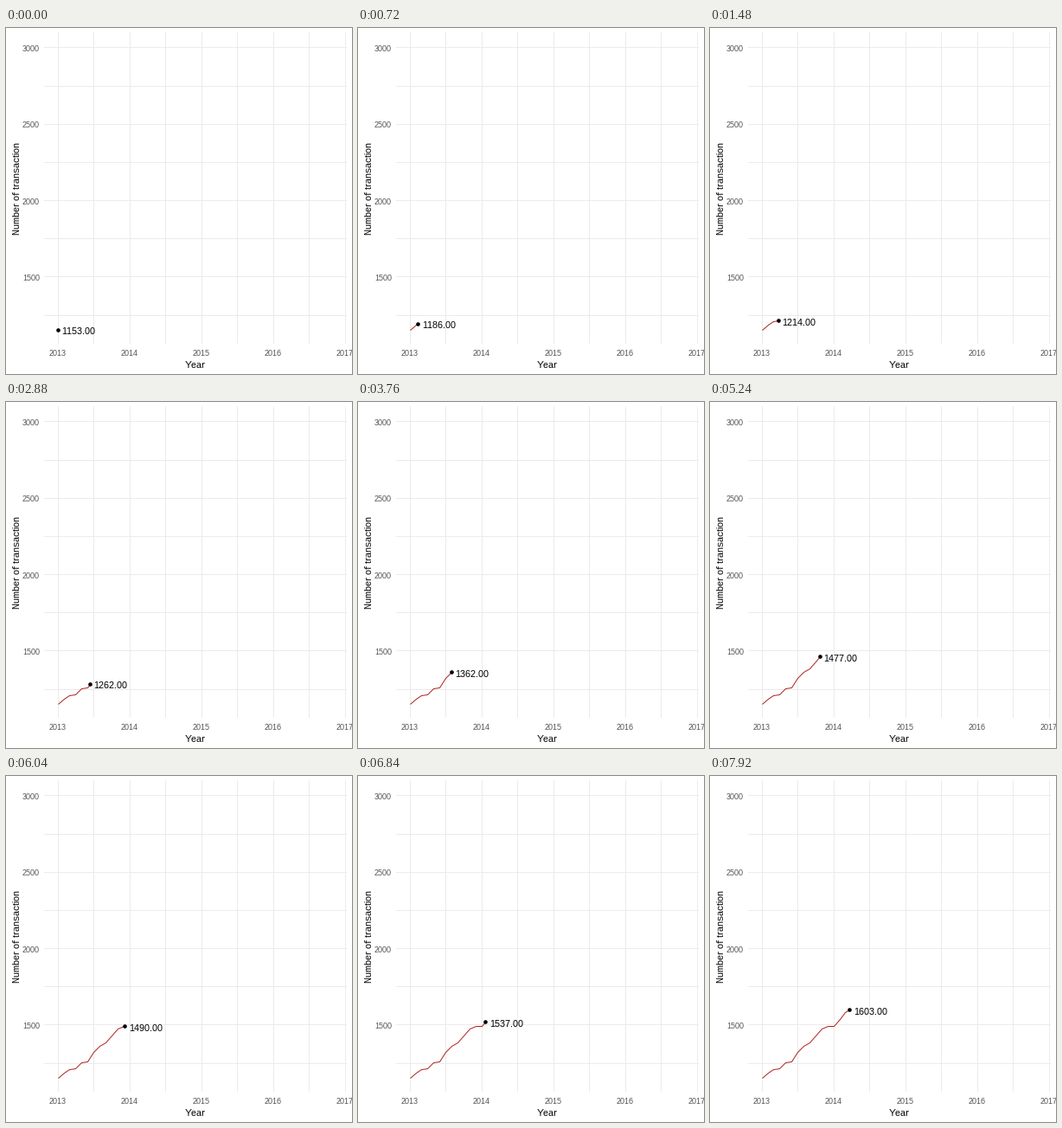
Write a matplotlib script that moves like this. It is 400 px wide and 400 px high and loops after 8 s.

```python
import math
import numpy as np
import matplotlib.pyplot as plt
from matplotlib.animation import FuncAnimation
from matplotlib.patches import Circle

SIZE, FRAMES, STEP_MS = 400, 200, 40
X0, YEAR_PX = 60.0, 83.0
SPEED = 0.511  # pixels per frame

# Whole-pixel hinting keeps the small text crisp
plt.rcParams.update({"font.family": "Liberation Sans",
                     "text.hinting": "native",
                     "text.hinting_factor": 1})

# Monthly counts, starting January 2013
COUNTS = np.array([1153, 1186, 1207, 1214, 1251, 1262, 1321, 1362,
                   1386, 1427, 1477, 1490, 1490, 1537, 1584, 1603])
MONTHS = np.datetime64("2013-01") + np.arange(len(COUNTS))
DAYS = (MONTHS.astype("datetime64[D]") - np.datetime64("2013-01-01")).astype(int)
XS = X0 + DAYS * YEAR_PX / 365


def to_y(value):
    return 287.5 - (value - 1500) * 265 / 1500


def pixel(v):
    """Centre of the nearest pixel."""
    return np.ceil(np.asarray(v) - 0.5) + 0.5


YS = to_y(COUNTS)

fig = plt.figure(figsize=(SIZE / 72, SIZE / 72), dpi=72, facecolor="white")
ax = fig.add_axes([0, 0, 1, 1])
ax.set_xlim(0, SIZE)
ax.set_ylim(SIZE, 0)
ax.axis("off")


def rule(xs, ys):
    ax.plot(xs, ys, color="#EBEBEB", lw=1, snap=False,
            solid_capstyle="butt", zorder=1)


def tick(x, y, text, ha):
    ax.text(x, y, text, size=9, color="#4D4D4D", ha=ha, va="baseline")


for k in range(9):
    x = pixel(X0 + k * YEAR_PX / 2)
    rule([x, x], [5, 365])
for value in range(1250, 3001, 250):
    y = pixel(to_y(value))
    rule([44, 394], [y, y])
for k in range(5):
    tick(X0 + k * YEAR_PX, 379, str(2013 + k), "center")
for value in range(1500, 3001, 500):
    tick(39, math.floor(to_y(value)) + 5, str(value), "right")

ax.text(219, 393, "Year", size=11, ha="center", va="baseline")
ax.text(16, 185.5, "Number of transaction", size=11, rotation=90,
        rotation_mode="anchor", ha="center", va="baseline")

trail, = ax.plot([], [], color="firebrick", lw=1, snap=False,
                 solid_capstyle="butt", zorder=2)
dot = ax.add_patch(Circle((X0, YS[0]), 2.3, fc="black", lw=0,
                          snap=False, zorder=3))
label = ax.text(0, 0, "", size=11, ha="left", va="baseline", zorder=4)


def draw(i):
    x = X0 + SPEED * i
    y = np.interp(x, XS, YS)
    done = XS < x
    trail.set_data(pixel(np.append(XS[done], x)), pixel(np.append(YS[done], y)))
    dot.center = (float(pixel(x)), float(pixel(y)))
    nearest = int(np.interp(x, XS, np.arange(len(XS))) + 0.5)
    label.set_text(f"{COUNTS[nearest]:.2f}")
    label.set_position((math.floor(x + 4.95), math.floor(y + 6)))
    return trail, dot, label


anim = FuncAnimation(fig, draw, frames=FRAMES, interval=STEP_MS,
                     init_func=lambda: draw(0), repeat=True, repeat_delay=0)
plt.show()
```
